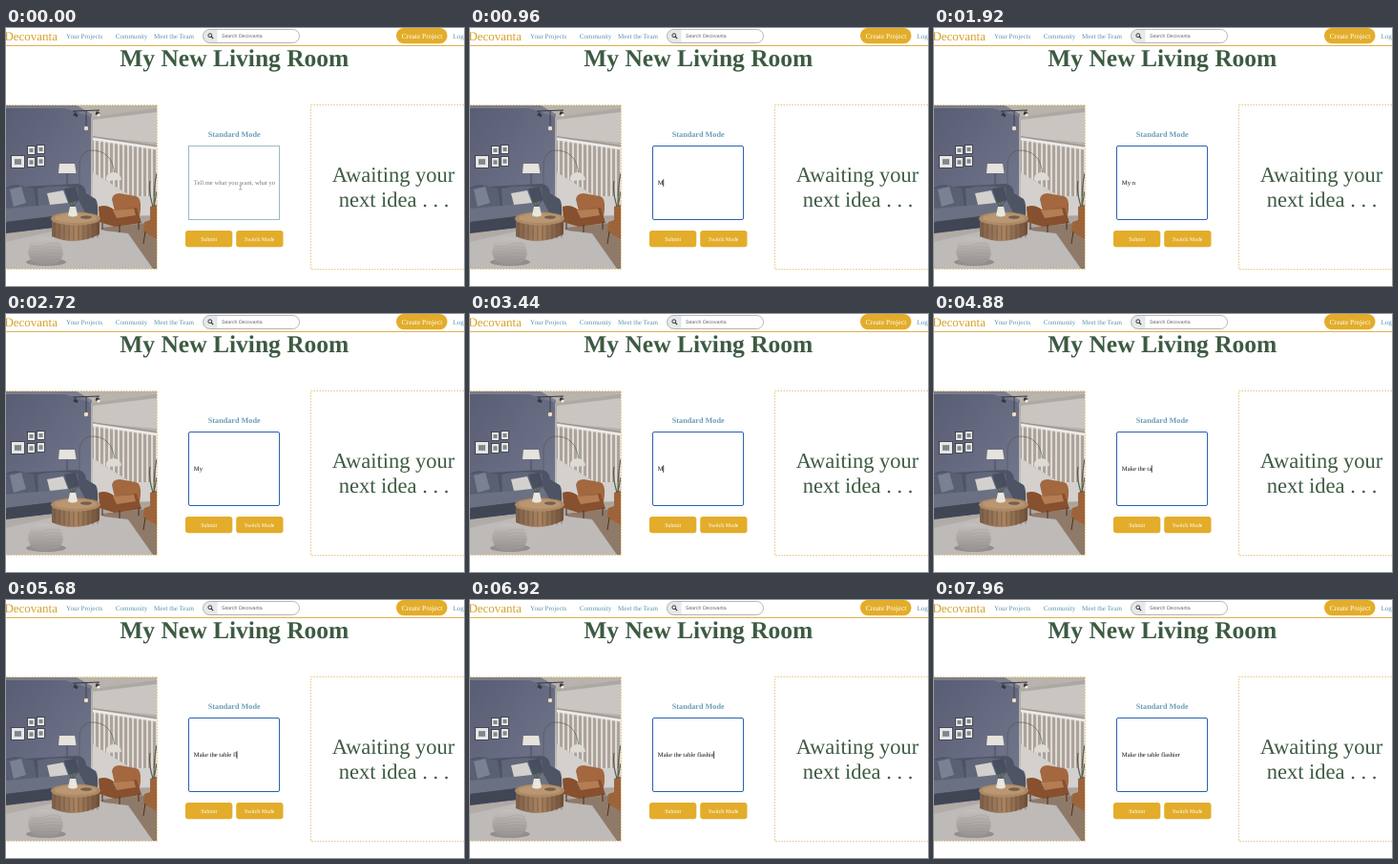
Animation of 480x270 px, one loop 8 s. Source, as an HTML page:

```html
<!DOCTYPE html>
<html lang="en">
<head>
<meta charset="utf-8">
<title>My New Living Room</title>
<style>
html, body { margin: 0; width: 100%; height: 100%; overflow: hidden; background: #fff; }
svg { display: block; width: 100%; height: 100%; }
text { font-family: "Liberation Serif", serif; white-space: pre; text-rendering: geometricPrecision; }
.nav { font-size: 7.05px; fill: #5f93ad; }
.mid { text-anchor: middle; }
.bold { font-weight: bold; }
.gold { fill: #e3ad2b; }
.dots { fill: none; stroke: #e8c67a; stroke-width: .9; stroke-dasharray: 1.7 1.3; }
.idea { font-size: 22.5px; fill: #3d5b42; }
.btn { font-size: 5.9px; fill: #fff; }
.entry { font-size: 6.65px; }
</style>
</head>
<body>
<svg viewBox="0 0 480 270">
  <defs>
    <linearGradient id="wall" x1="0" y1="0" x2="1" y2="1">
      <stop offset="0" stop-color="#585d73"/><stop offset="1" stop-color="#747990"/>
    </linearGradient>
    <linearGradient id="hall" x1="0" y1="0" x2="0" y2="1">
      <stop offset="0" stop-color="#aaa6a2"/><stop offset="1" stop-color="#cbc8c5"/>
    </linearGradient>
    <linearGradient id="floor" x1="0" y1="0" x2="0" y2="1">
      <stop offset="0" stop-color="#aaa39d"/><stop offset="1" stop-color="#bdb9b6"/>
    </linearGradient>
    <linearGradient id="wood">
      <stop offset="0" stop-color="#7d604a"/><stop offset=".5" stop-color="#a98563"/><stop offset="1" stop-color="#6f503a"/>
    </linearGradient>
    <linearGradient id="wool" x1="0" y1="0" x2="0" y2="1">
      <stop offset="0" stop-color="#c4c1be"/><stop offset="1" stop-color="#96928f"/>
    </linearGradient>
    <clipPath id="frame"><rect y="81" width="158" height="171"/></clipPath>
  </defs>
  <rect width="480" height="270" fill="#fff"/>

  <g id="header">
    <text x="54" y="13" font-size="13" text-anchor="end" fill="#d5a32b">Decovanta</text>
    <text class="nav" x="63" y="11">Your Projects</text>
    <text class="nav" x="114.7" y="11">Community</text>
    <text class="nav" x="155" y="11">Meet the Team</text>
    <rect x="206.5" y="1.5" width="101" height="14" rx="7" fill="#fff"/>
    <path d="M221.5 1.5H213.5a7 7 0 0 0 0 14h8z" fill="#e7e8eb"/>
    <rect x="206.5" y="1.5" width="101" height="14" rx="7" fill="none" stroke="#a3a3a3" stroke-width=".8"/>
    <path d="M215.2 9.2l2 2" stroke="#222" stroke-width="1.1"/>
    <circle cx="213.8" cy="7.7" r="1.9" fill="none" stroke="#222" stroke-width=".9"/>
    <text x="226" y="10.3" font-size="5.2" fill="#666" style="font-family:'Liberation Sans',sans-serif">Search Decovanta</text>
    <rect class="gold" x="409" y="0" width="53.5" height="16.3" rx="8"/>
    <text class="mid" x="436" y="10.8" font-size="7.5" fill="#fff">Create Project</text>
    <text class="nav" x="468.5" y="11">Log In</text>
    <path d="M0 18.5H480" stroke="#dcb351"/>
  </g>
  <text class="mid bold" x="239.3" y="39.5" font-size="25.5" fill="#3d5b42">My New Living Room</text>

  <g clip-path="url(#frame)">
    <rect y="81" width="91" height="125" fill="url(#wall)"/>
    <path d="M89 81H158V215H89z" fill="url(#hall)"/>
    <path d="M70 81H158V84L90 93z" fill="#b9b3ac"/>
    <path d="M0 81H74L90 90V93L62 84H0z" fill="#7c7e8c"/>
    <path d="M91 96L158 88V120L91 114z" fill="#c9c5c0"/>
    <path d="M91 119L158 128V178L91 174z" fill="#aca39a"/>
    <g id="slats" stroke="#e9e6e2" stroke-width="1.7"></g>
    <path d="M91 116L158 126" stroke="#eeecea" stroke-width="2.4"/>
    <path d="M91 113.6L158 123.5" stroke="#94877b" stroke-width=".8"/>
    <path d="M91 151L131 176H158V200H91z" fill="#d3d0cd"/>
    <path d="M0 212L60 199L158 196V252H0z" fill="url(#floor)"/>
    <path d="M100 209L158 203V252H138z" fill="#8f7a69"/>
    <path d="M0 224L70 208L128 215L154 252H0z" fill="#bebab7"/>

    <g stroke="#343640" fill="none">
      <path d="M70 87L98 86" stroke-width="1"/>
      <path d="M73 87v4M84 86v17M96 86v3" stroke-width=".8"/>
      <path d="M71 90l4 2M94 89l4 1" stroke-width="3"/>
    </g>
    <circle cx="84" cy="105" r="2.2" fill="#f2dfb7"/>
    <circle cx="97" cy="91" r="1.5" fill="#fff3d7"/>
    <g id="pictures" fill="#e6e6e4" stroke="#30343d" stroke-width=".8"></g>

    <path d="M77 202V142Q78 130 88 128Q111 127 114 153" fill="none" stroke="#555" stroke-width=".6"/>
    <path d="M105 156Q107 151 114 151Q120 152 121 159L105 160z" fill="#dedad4"/>
    <path d="M64 151V174" stroke="#454650" stroke-width=".8"/>
    <path d="M56 142H72L73.5 152H55z" fill="#e6e2dc"/>

    <path d="M0 167Q8 162 20 166L74 163Q83 163 84 173L94 179Q97 183 96 199L80 206L0 214z" fill="#4e5464"/>
    <path d="M0 168Q14 163 29 168L32 187L0 192z" fill="#596073"/>
    <path d="M33 168Q52 163 75 167L77 183L34 187z" fill="#60677a"/>
    <path d="M0 189L77 182L83 193L0 203z" fill="#6b7183"/>
    <path d="M0 203L81 193V205L0 215z" fill="#414655"/>
    <path d="M4 169L16 166L21 183L8 187z" fill="#7b8192"/>
    <path d="M43 173L60 170L65 183L46 185z" fill="#d3d1ce"/>
    <path d="M61 168L73 166L77 180L66 183z" fill="#484e60"/>

    <path d="M111 179Q112 173 119 173L136 176Q142 177 141 190L139 204L116 201z" fill="#a3683f"/>
    <path d="M97 187Q106 184 114 191L137 188L142 204L114 208L98 203z" fill="#87502e"/>
    <path d="M112 191L134 189L136 196L116 199z" fill="#b57d53"/>
    <path d="M101 204v7M119 206v8M139 203v8" stroke="#442e22"/>
    <path d="M151 187Q157 184 160 185V222L144 213L145 203L151 201z" fill="#9d643c"/>
    <path d="M146 213l-2 13" stroke="#4a3222"/>
    <path d="M154 187Q149 170 151 160M155 187Q155 165 158 152M155 187L158 171" fill="none" stroke="#59604f" stroke-width="1.2"/>

    <path d="M48 200V218Q72 229 98 216V199z" fill="url(#wood)"/>
    <g id="staves" stroke="#684a35" stroke-width=".6"></g>
    <ellipse cx="73" cy="199.5" rx="26" ry="7" fill="#ad8965"/>
    <ellipse cx="73" cy="199" rx="22" ry="5" fill="#b89772"/>
    <path d="M70 189Q65 183 68 177M70 189Q73 182 76 179M70 188V175" stroke="#4d5b48" fill="none"/>
    <path d="M67 187H73L75 196Q70 199 65 196z" fill="#e9e6e0"/>
    <ellipse cx="84" cy="198" rx="6" ry="1.8" fill="#75604e"/>

    <ellipse cx="42" cy="245" rx="21" ry="4" fill="#928e8b"/>
    <path d="M23 234Q25 219 41 219Q58 220 60 235Q59 248 42 248Q24 248 23 234z" fill="url(#wool)"/>
    <g id="knit" fill="none" stroke="#8f8b88" stroke-width=".5" opacity=".5"></g>
  </g>
  <path class="dots" d="M0 80.5H158.5V252.5H0"/>

  <text class="mid bold" x="239.2" y="114" font-size="8.2" fill="#6c9db5">Standard Mode</text>
  <rect id="box" x="191.5" y="123.5" width="95" height="77" fill="#fff"/>
  <text id="entry" class="entry" x="196.8" y="164.2"></text>
  <path id="caret" d="M0 158.3v7.6" stroke="#111" stroke-width=".8"/>
  <path id="beam" d="M244.2 164.3h1l.6.5.6-.5h1M245.8 164.8v3.8M244.2 169.1h1l.6-.5.6.5h1" fill="none" stroke="#555" stroke-width=".5"/>
  <rect class="gold" x="188" y="212" width="49.3" height="17.3" rx="3"/>
  <rect class="gold" x="241.2" y="212" width="49.3" height="17.3" rx="3"/>
  <text class="btn mid" x="212.7" y="222.7">Submit</text>
  <text class="btn mid" x="265.7" y="222.7">Switch Mode</text>

  <path class="dots" d="M480 80.5H319.5V252.5H480"/>
  <text class="idea mid" x="406" y="161">Awaiting your</text>
  <text class="idea mid" x="406.5" y="187">next idea . . .</text>
</svg>
<script>
const $ = id => document.getElementById(id);
const repeat = (n, f) => Array.from({ length: n }, (_, i) => f(i)).join('');

$('slats').innerHTML = repeat(14, i => {
  const x = 93 + i * 5, y = 117 + i * .74;
  return `<path d="M${x} ${y}V${Math.min(178, 153 + i * 3.1)}"/>`;
});
$('staves').innerHTML = repeat(10, i => `<path d="M${51 + i * 5} 204V${219 + 3 * Math.sin(i / 3)}"/>`);
$('knit').innerHTML = repeat(6, i => `<path d="M25 ${227 + i * 3}q8 ${4 - i} 16 0t17 0"/>`);
$('pictures').innerHTML = [[5.5, 133.5, 14, 13], [22.5, 123.5, 8, 9], [32.5, 122.5, 8, 9], [22.5, 135.5, 8, 10], [32.5, 134.5, 8, 10]]
  .map(([x, y, w, h]) => `<rect x="${x}" y="${y}" width="${w}" height="${h}"/>` +
    `<rect x="${x + w * .25}" y="${y + h * .28}" width="${w * .5}" height="${h * .44}" fill="#7f868c" stroke="none"/>`).join('');

const LOOP = 8000, FOCUS = 520, FIRST_KEY = 960, BLINK = 500;
const hint = 'Tell me what you want, what yo';
const full = 'Make the table flashier';

// [time, text] for every key press
const keys = [[FOCUS, ''], [FIRST_KEY, 'M'], [1120, 'My'], [1240, 'My '], [1360, 'My n'],
  [2160, 'My '], [3100, 'My'], [3220, 'M'], [3520, 'Ma'], [3680, 'Mak'], [3840, 'Make']];
for (let n = 5; n <= 17; n++) keys.push([4000 + (n - 5) * 130, full.slice(0, n)]);
[5960, 6160, 6360, 6560, 6760, 7080].forEach((t, i) => keys.push([t, full.slice(0, 18 + i)]));

const entry = $('entry'), caret = $('caret'), box = $('box');

function draw(t) {
  const key = keys.filter(k => k[0] <= t).pop();
  const text = key ? key[1] : '';
  entry.textContent = text || hint;
  entry.setAttribute('fill', text ? '#111' : '#777');
  box.setAttribute('stroke', key ? '#2a62ae' : '#9bb9c4');
  box.setAttribute('rx', key ? 1.5 : 0);
  const on = key && Math.floor((t - key[0]) / BLINK) % 2 === 0;
  caret.setAttribute('visibility', on ? 'visible' : 'hidden');
  const width = text ? entry.getComputedTextLength() : 0;
  caret.setAttribute('transform', `translate(${196.8 + width} 0)`);
  $('beam').setAttribute('visibility', t < FIRST_KEY ? 'visible' : 'hidden');
}

const start = performance.now();
function tick() {
  draw((performance.now() - start) % LOOP);
  requestAnimationFrame(tick);
}
tick();
</script>
</body>
</html>
```
